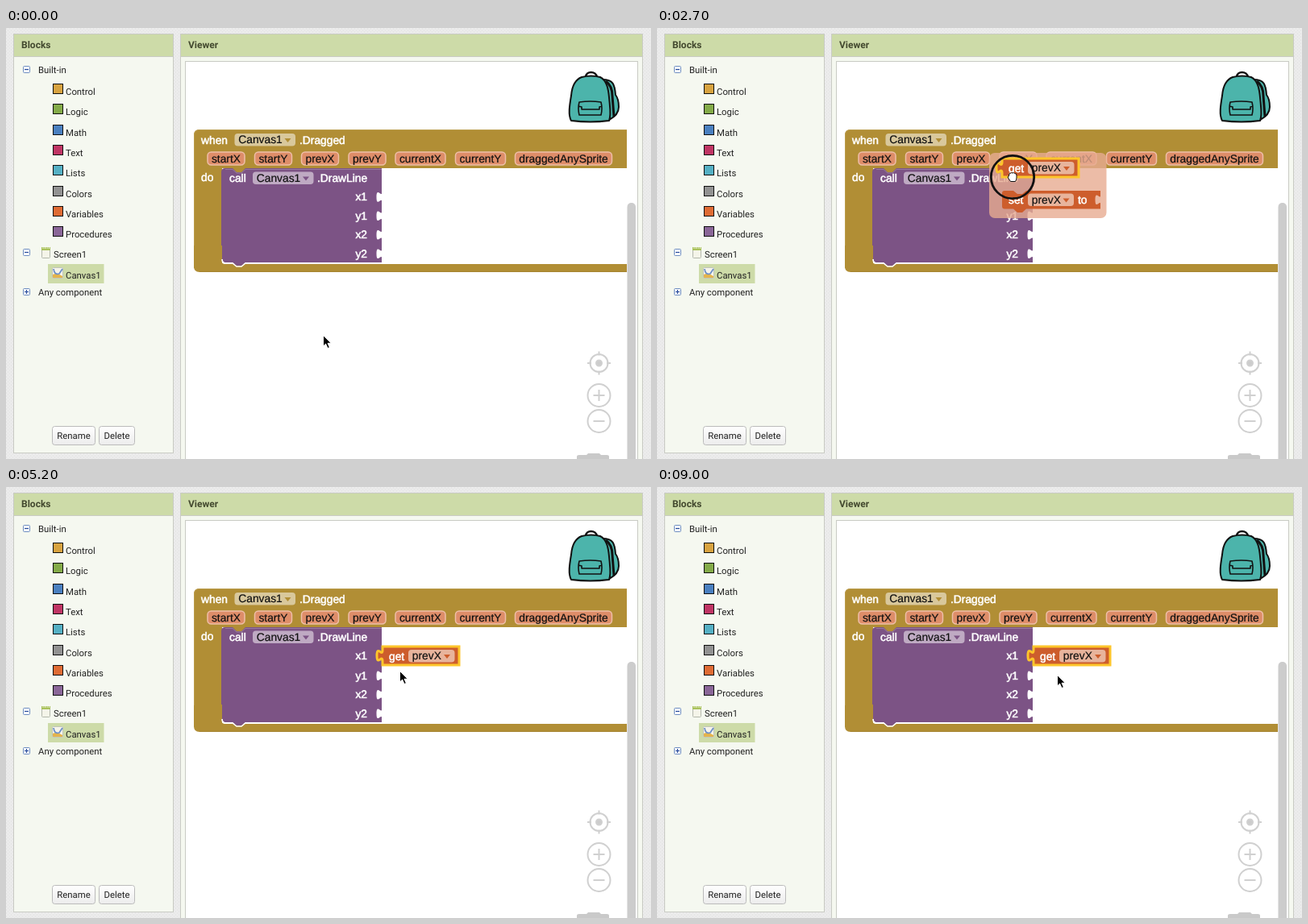
These frames come from a looping animation (800x535 px, 9100 ms). An HTML page:

```html
<!DOCTYPE html>
<html lang="en">
<head>
<meta charset="utf-8">
<title>Connecting a block</title>
<style>
  html, body { margin: 0; width: 100%; height: 100%; overflow: hidden; }
  svg { display: block; width: 800px; height: 535px; text-rendering: geometricPrecision; }
  .ui { font: 11.35px Roboto, sans-serif; fill: #222; }
  .head { font: bold 12px Roboto, sans-serif; fill: #43492f; }
  .label, .field { font: 13.8px "Liberation Sans", Arial, sans-serif; }
  .label { fill: #fff; stroke: #fff; stroke-width: .55px; }
  .field { fill: #111; stroke: #111; stroke-width: .2px; }
  .lit { stroke: #fdc52b; stroke-width: 3px; }
</style>
</head>
<body>
<svg id="stage" viewBox="0 0 800 535">
  <defs>
    <pattern id="weave" width="4" height="4" patternUnits="userSpaceOnUse">
      <rect width="4" height="4" fill="#ececec"/>
      <path d="M0 0h1v2h-1zM2 2h1v2h-1z" fill="#e5e5e5"/>
    </pattern>
    <linearGradient id="button" x2="0" y2="1">
      <stop stop-color="#fff"/><stop offset="1" stop-color="#ececec"/>
    </linearGradient>
    <clipPath id="work"><rect x="223" y="42" width="547" height="493"/></clipPath>
  </defs>

  <rect width="800" height="535" fill="url(#weave)"/>
  <g stroke="#c9cbc4">
    <rect x="9.5" y="7.5" width="198" height="520" fill="#f5f8f0"/>
    <rect x="9.5" y="7.5" width="198" height="28" fill="#cddba8"/>
    <rect x="216.5" y="7.5" width="573" height="540" fill="#f5f8f0"/>
    <rect x="216.5" y="7.5" width="573" height="28" fill="#cddba8"/>
    <rect x="222.5" y="41.5" width="561" height="510" fill="#fff"/>
  </g>
  <text class="head" x="19" y="25">Blocks</text>
  <text class="head" x="226" y="25">Viewer</text>
  <g id="sidebar"></g>

  <g id="backpack" stroke="#111" stroke-width="2" stroke-linejoin="round">
    <path d="M740 64C753 64 755 70 756 83Q760 88 760 98Q760 108 748 114Z" fill="#4cb4ab"/>
    <path d="M744 66Q752 72 752 84L754 110" fill="none" stroke-width="3"/>
    <path d="M719 61C719 53 732 53 733 61" fill="none" stroke-width="2.500"/>
    <path d="M701 115C697 108 699 96 701 84C702 72 706 64 714 61Q726 58 737 61C745 65 747 75 748 86C749 98 751 108 748 115Q725 118 701 115Z" fill="#4cb4ab"/>
    <path d="M711 92Q725 90 738 92Q740 100 738 108H711Q709 100 711 92ZM710 97L714 98V101H736V98L739 97" fill="none" stroke-width="1.600"/>
  </g>

  <g clip-path="url(#work)">
    <path d="M233 133Q233 126 240 126H770V174H268V298H233Z" fill="#b18e35"/>
    <path d="M233.5 296V133Q233.5 126.5 240 126.5H770" fill="none" stroke="#bb9c4c"/>
    <path d="M267 179Q267 174 272 174H466V270H267Z" fill="#7c5385"/>
    <path d="M272 175.5H281L286 180H292L297 175.5H466" fill="none" stroke="#967a9e"/>
    <path d="M281 174L286 179H292L297 174Z" fill="#b18e35"/>
    <g id="header"></g>
    <g id="lower">
      <path d="M233 270H267V288Q267 293 272 293H770V303H240Q233 303 233 296Z" fill="#b18e35"/>
      <path d="M240 302.5H770" stroke="#a5832f"/>
      <path d="M268 240H466V291H297L292 295H286L281 291H272Q268 291 268 286Z" fill="#7c5385"/>
      <path d="M268 287Q268 292 273 292H281L286 296H292L297 292H466" fill="none" stroke="#fff" stroke-width="1.600"/>
    </g>
    <g id="sockets"></g>
  </g>

  <rect id="scrollbar" x="770.5" y="217" width="10.5" height="340" rx="5" fill="#ccc"/>
  <g fill="none" stroke="#d0d0d0" stroke-width="2">
    <circle cx="735.5" cy="416" r="11"/>
    <path d="M735.5 401.500v5M735.5 425.500v5M721 416h5M745 416h5"/>
    <circle cx="735.5" cy="416" r="3.500" fill="#ccc"/>
    <circle cx="735.5" cy="456" r="14"/>
    <circle cx="735.5" cy="488" r="14"/>
    <path d="M728.5 456h14M735.500 449v14M728.500 488h14"/>
  </g>
  <path d="M708 535V532Q708 530 711 530H720L722 528H736L738 530H745Q748 530 748 532V535Z" fill="#c9c9c9"/>

  <g id="popup">
    <rect x="412" y="155" width="145.500" height="81" rx="7" fill="#e8ac92" opacity=".8"/>
    <g id="setter" transform="translate(428 202)"></g>
  </g>
  <g id="getter"></g>
  <g id="loose"></g>

  <circle id="ring" r="26.700" fill="none" stroke="#111" stroke-width="2.800"/>
  <path id="arrow" d="M.5 .5V14L3.600 11.100L6 16.500L8.400 15.500L6 10.300H10.200Z" fill="#000" stroke="#fff" stroke-width="1"/>
  <path id="hand" d="M-4.500 -2Q-4.500 -5 -2.500 -4.500Q-1.500 -6 0 -5Q1.500 -6 2.500 -4.500Q5 -5 5 -2V1Q5 3 3.500 5.500H-2.500L-5.500 1Q-6.500 -1 -4.500 -1Z" fill="#fff" stroke="#111"/>
</svg>

<script>
const LOOP = 9100, STEP = 100;
const RUST = '#cd5d2c';
const $ = id => document.getElementById(id);
const put = (id, ...parts) => { $(id).innerHTML += parts.join(''); };

const text = (cls, x, y, s, extra = '') => `<text class="${cls}" x="${x}" y="${y}" ${extra}>${s}</text>`;
const box = (x, y, w, h, fill, extra = '') =>
  `<rect x="${x}" y="${y}" width="${w}" height="${h}" fill="${fill}" ${extra}/>`;
const dropdown = (x, y, w, name, fill, arrow) =>
  box(x, y, w, 15.5, fill, 'rx="4"') + text('field', x + 4.8, y + 12.4, name) +
  `<path d="M${x + w - 13.5} ${y + 6}h8l-4 5z" fill="${arrow}"/>`;

// Sidebar tree
const toggle = (y, plus) => box(21.5, y - 4.5, 8, 8, '#fff', 'rx="1" stroke="#6c8cc0"') +
  `<path d="M23 ${y - .5}h5${plus ? `M25.500 ${y - 3}v5` : ''}" stroke="#24489a" stroke-width="1.200"/>`;
const drawers = [
  ['Control', '#d8a340'], ['Logic', '#84ab49'], ['Math', '#4a80c0'], ['Text', '#c03565'],
  ['Lists', '#55b0c4'], ['Colors', '#929292'], ['Variables', '#df6b34'], ['Procedures', '#8a6698']
];
put('sidebar',
  toggle(52), text('ui', 40, 56, 'Built-in'),
  ...drawers.map(([name, color], i) => {
    const y = 83 + i * 25.3;
    return box(58.5, Math.round(y) - 13.5, 12, 12, color, 'stroke="#111"') + text('ui', 74, y, name);
  }),
  toggle(279),
  box(44.5, 273.5, 10, 12, '#f4f4e9', 'rx="1" stroke="#b4b8ac"'), box(44, 272, 11, 4, '#a9c25c'),
  '<path d="M46 271v3M48.500 271v3M51 271v3M53.500 271v3" stroke="#fff" stroke-width=".8"/>',
  text('ui', 59, 285, 'Screen1'),
  box(52, 293, 69.5, 24, '#cddba8'),
  box(57.5, 297.5, 13, 13, '#f6f4ea', 'rx="1" stroke="#c0c4bc"'),
  '<path d="M58 306Q63 303 70 308V310H58Z" fill="#e4b44c"/>',
  '<path d="M59 299Q60 307 66 305L70 299" fill="none" stroke="#6c8fc8" stroke-width="1.800"/>',
  text('ui', 74, 311, 'Canvas1'),
  toggle(328, true), text('ui', 40, 332, 'Any component'),
  ...[[57.5, 53, 'Rename'], [115.5, 44, 'Delete']].map(([x, w, s]) =>
    box(x, 494.5, w, 23, 'url(#button)', 'rx="3" stroke="#bbb"') +
    text('ui', x + w / 2, 510, s, 'text-anchor="middle"')));

// Event block header and its parameters
const params = [[250, 46, 'startX'], [308.5, 46, 'startY'], [366.5, 46, 'prevX'], [425, 46, 'prevY'],
  [483, 62, 'currentX'], [557.5, 62, 'currentY'], [631.5, 120, 'draggedAnySprite']];
put('header',
  text('label', 242, 143.5, 'when'), dropdown(283.5, 131, 75.5, 'Canvas1', '#d9c89c', '#b18e35'),
  text('label', 364, 143.5, '.Dragged'),
  ...params.map(([x, w, s]) =>
    box(x, 154, w, 16, '#de8d69', `rx="4.500" stroke="#eebfa8" stroke-width="1.500" ${s === 'prevX' ? 'id="hovered"' : ''}`) +
    text('field', x + w / 2, 166.8, s, 'text-anchor="middle"')),
  text('label', 242, 190, 'do'), text('label', 277, 191, 'call'),
  dropdown(306, 178.5, 75.5, 'Canvas1', '#bfaac3', '#7c5385'), text('label', 386, 191, '.DrawLine'));

const socket = (x, y, fill) =>
  `<path d="M${x} ${y}c0 9 -7 -7 -7 6.750s7 -2.250 7 6.750z" fill="${fill}"/>`;
const row = (name, y) => text('label', 448, y + 4.5, name, 'text-anchor="end"') + socket(466.5, y - 6.5, '#fff');
put('sockets', row('x1', 209.7));
put('lower', row('y1', 233), row('x2', 256.5), row('y2', 280));

// Variable blocks, drawn from their own top left corner
const getBlock = (shift, fill, tint) =>
  `<path class="shape" d="M0 0H${95 + shift}V23H0V18c0 -9 -7 7 -7 -6.750s7 2.250 7 -6.750Z" fill="${fill}"/>` +
  text('label', 8 + shift, 16.8, 'get') + dropdown(32 + shift, 4, 57.5, 'prevX', tint, fill);
put('getter', getBlock(0, RUST, '#e8b49c'));
put('loose', getBlock(26, '#dc7a4c', '#efc8b5'),
  '<circle cx="17" cy="11.500" r="7.500" fill="#d9502e" stroke="#7d2c14"/>',
  '<path d="M13.500 8l7 7M20.500 8l-7 7" stroke="#fff" stroke-width="1.500"/>');
put('setter',
  `<path d="M3 0H14L19 4H25L30 0H122V22.500H30L25 27H19L14 22.500H3Q0 22.500 0 19V3Q0 0 3 0Z" fill="${RUST}"/>`,
  socket(122.5, 4.5, '#ebb9a3'), text('label', 8, 16.3, 'set'),
  dropdown(32, 3.5, 57, 'prevX', '#e8b49c', RUST), text('label', 94, 16.3, 'to'));

// Motion: [time, x, y] stops with eased travel between them
const POPUP = 1600, HAND = 2400, PRESS = 2600, DRAG = 2900, SNAP = 4800, RELEASE = 5000;
const pointerPath = [[0, 393, 381], [500, 393, 381], [1400, 393, 163], [1800, 393, 163], [2100, 414, 168],
  [2500, 441, 185], [2800, 441, 185], [4200, 499, 208], [4800, 479, 210], [5000, 479, 210],
  [5200, 488, 228], [5500, 496, 233]];
const blockPath = [[0, 428, 162], [2800, 428, 162], [3100, 440, 170], [4200, 494, 197], [4800, 474, 198.5]];

function along(path, t) {
  const i = path.findIndex(stop => stop[0] > t);
  if (i < 0) return path[path.length - 1].slice(1);
  const [t0, x0, y0] = path[i - 1], [t1, x1, y1] = path[i];
  const p = (t - t0) / (t1 - t0), e = p * p * (3 - 2 * p);
  return [x0 + (x1 - x0) * e, y0 + (y1 - y0) * e];
}
const show = (id, on) => { $(id).style.display = on ? '' : 'none'; };
const move = (id, [x, y]) => $(id).setAttribute('transform', `translate(${x.toFixed(2)} ${y.toFixed(2)})`);
const litShapes = document.querySelectorAll('#getter .shape, #loose .shape');

function draw(t) {
  const pointer = along(pointerPath, t);
  const joined = t >= SNAP, dragging = t >= DRAG && !joined;
  const grabbing = t >= HAND && t < RELEASE;

  show('popup', t >= POPUP && t < DRAG);
  show('scrollbar', t < POPUP || t >= PRESS);
  show('getter', t >= POPUP && !dragging);
  show('loose', dragging);
  show('ring', t >= PRESS && t < RELEASE);
  show('hand', grabbing);
  show('arrow', !grabbing);
  for (const id of ['ring', 'hand', 'arrow']) move(id, pointer);
  move('getter', joined ? [467, 198] : [428, 162]);
  move('loose', along(blockPath, t));
  move('lower', [0, joined ? 1 : 0]);
  litShapes.forEach(s => s.classList.toggle('lit', t >= PRESS));
  $('hovered').setAttribute('fill', t >= 1300 && t < 2300 ? '#e9b096' : '#de8d69');
}

const start = performance.now();
function tick() {
  const t = (performance.now() - start) % LOOP;
  draw(Math.floor(t / STEP) * STEP);
  requestAnimationFrame(tick);
}
draw(0);
requestAnimationFrame(tick);
</script>
</body>
</html>
```
